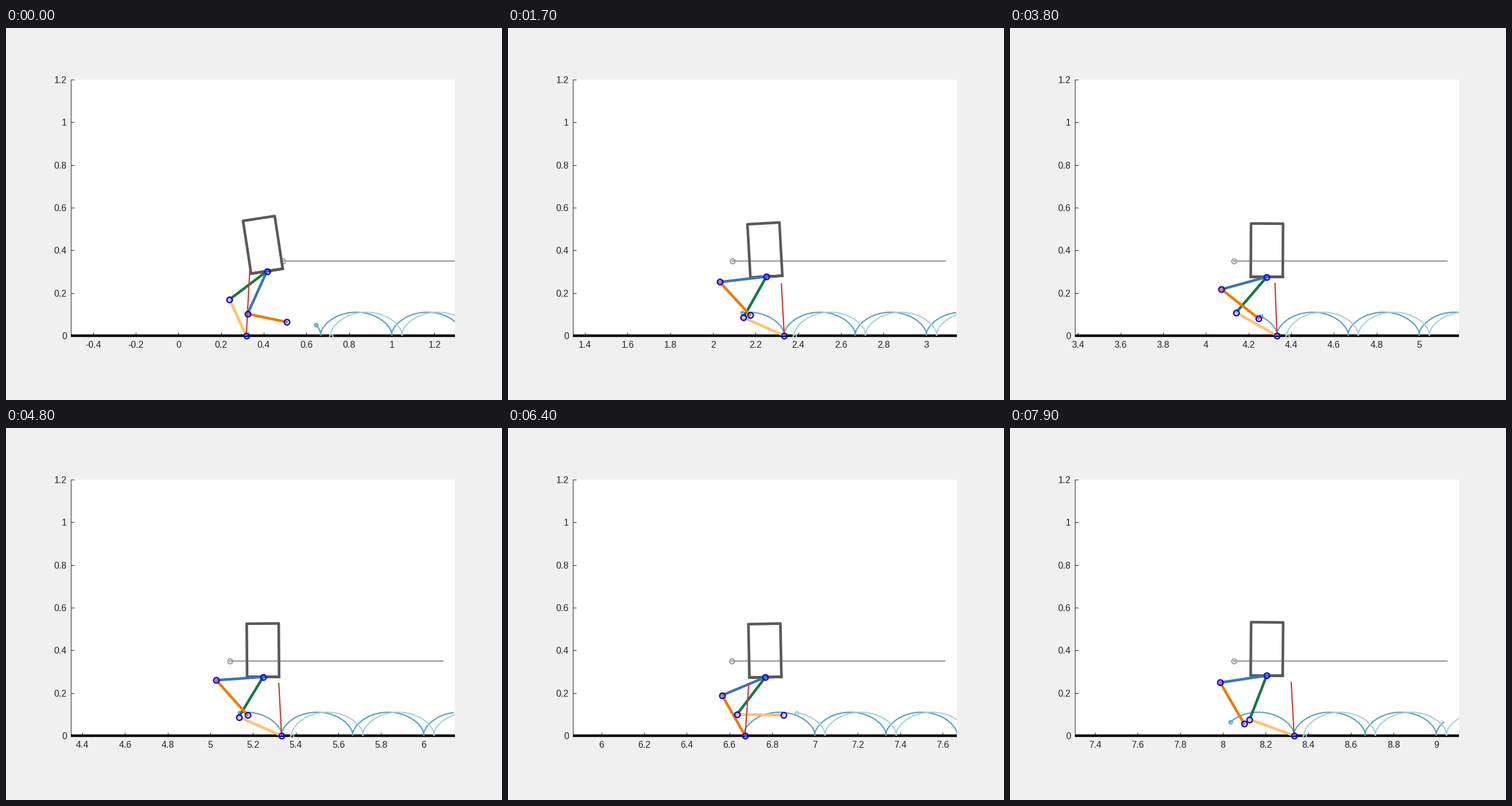
Write a matplotlib script that moves like this. It is 864 by 648 pixels and loops after 8000 ms.

```python
import numpy as np
import matplotlib.pyplot as plt
from matplotlib.animation import FuncAnimation
from matplotlib.ticker import FuncFormatter, MultipleLocator

W, H, DPI = 864, 648, 100
PX = 72 / DPI                      # one pixel in points
FRAMES, INTERVAL = 80, 100

THIGH = 0.22
BODY_W, BODY_H = 0.15, 0.25
STRIDE, SWING, LIFT = 1 / 3, 0.219, 0.11
LEAD = (0, 1 / 6)                  # gait phase shift of each leg

# body state at a few simulation ticks
TICKS = [12, 36, 52, 74, 103, 148, 182, 201]
HEIGHT = [0.426, 0.409, 0.4016, 0.402, 0.4005, 0.4005, 0.398, 0.4065]
TILT = [8.7, 5.2, 3.2, 2.4, -0.3, 1.1, 1.1, -0.5]
SHANK = [0.187, 0.200, 0.2097, 0.2104, 0.2205, 0.217, 0.2187, 0.222]
FORCE = [0.315, 0.255, 0.243, 0.245, 0.245, 0.245, 0.243, 0.25]

plt.rcParams["font.family"] = "Liberation Sans"
fig = plt.figure(figsize=(W / DPI, H / DPI), dpi=DPI, facecolor="#f0f0f0")
ax = fig.add_axes([113 / W, 112 / H, 669 / W, 446 / H])
ax.set_ylim(0, 1.2)
for side in ("top", "right", "bottom"):
    ax.spines[side].set_visible(False)
ax.spines["left"].set(linewidth=PX, color="#262626")
for axis in (ax.xaxis, ax.yaxis):
    axis.set_major_locator(MultipleLocator(0.2))
    axis.set_major_formatter(FuncFormatter(lambda v, _: f"{round(v, 1) + 0.0:g}"))
ax.tick_params(direction="in", length=6 * PX, width=PX, color="#262626",
               labelcolor="#262626", labelsize=16 * PX)
ax.tick_params(axis="x", pad=9.3 * PX)
ax.tick_params(axis="y", pad=7 * PX)


def stroke(color, width, z):
    return ax.plot([], [], color=color, lw=width * PX, zorder=z,
                   solid_joinstyle="round", snap=False)[0]


def rings(color, size, width, z):
    return ax.plot([], [], "o", mfc="none", mec=color, ms=size * PX,
                   mew=width * PX, zorder=z, clip_on=False, snap=False)[0]


ax.plot([0, 1], [0, 0], transform=ax.transAxes, color="black", lw=4.5 * PX,
        solid_capstyle="butt", clip_on=False, snap=False, zorder=2.6)

plan_line = stroke("#999999", 2.2, 3)
plan_dot = rings("#999999", 8.5, 2, 3)
step_lines = [stroke("#5fa3bd", 2.3, 3), stroke("#a9d1e1", 2.3, 3.1)]
step_dots = [rings("#5fa3bd", 6, 2, 3), rings("#a9d1e1", 6, 2, 3.1)]
body = stroke("#595959", 4.6, 4)
thighs = [stroke("#3d74b8", 4.6, 6), stroke("#17783f", 4.6, 5)]
shanks = [stroke("#ee7a05", 4.6, 6.1), stroke("#fdc26f", 4.6, 5.1)]
force = stroke("#c93a2d", 2.2, 7)
joints = rings("#0a0af0", 9.5, 2.5, 8)


def gait(t, leg):
    """Start of the current step and swing progress 0..1."""
    t = t - LEAD[leg]
    k = np.floor(t / STRIDE + 1e-9)
    return k * STRIDE, np.clip((t - k * STRIDE) / SWING, 0, 1)


def planned_step(t, leg):
    """Slightly widened cycloid."""
    x, s = gait(t, leg)
    a = 2 * np.pi * s
    x = x + (0, 0.381)[leg] + STRIDE * (s - 1.09 * np.sin(a) / (2 * np.pi))
    return x, LIFT / 2 * (1 - np.cos(a))


def landing(start, leg):
    """Touchdown position; the first steps fall one stride short."""
    t = start + LEAD[leg] + SWING
    return start + (0.34, 0.667)[leg] - 0.35 / (1 + np.exp((t - 0.5) / 0.02))


def foot_at(t, leg):
    delay = 0.013 * np.exp(-(t - 0.5) / 0.3)
    start, s = gait(t - delay, leg)
    bow, skew = ((0.055, 0.04), (0, 0.03))[leg]
    frac = s + bow * np.sin(np.pi * s) - skew * np.sin(2 * np.pi * s)
    a, b = landing(start - STRIDE, leg), landing(start, leg)
    y = 0.45 * LIFT * (1 - np.cos(2 * np.pi * s))
    return np.array([a + (b - a) * frac, y]), s >= 1


def knee_at(hip, foot, shank):
    v = foot - hip
    d = np.hypot(*v)
    v = v / d
    a = (THIGH**2 - shank**2 + d**2) / (2 * d)
    h = np.sqrt(max(THIGH**2 - a**2, 0))
    return hip + a * v + h * np.array([v[1], -v[0]])


def draw(i):
    n = 12 + i * 12 // 5           # simulation runs 2.4 ticks per frame
    t = 0.04 * n + 0.02
    height, tilt, shank, push = (np.interp(n, TICKS, v)
                                 for v in (HEIGHT, TILT, SHANK, FORCE))
    cx = t + 0.146 - 0.25 * np.exp(-(t - 0.5) / 0.36)
    ax.set_xlim(cx - 0.9, cx + 0.9)

    plan_line.set_data([t - 0.01, t + 0.99], [0.35, 0.35])
    plan_dot.set_data([t - 0.01], [0.35])
    ahead = np.linspace(t, t + 1, 201)
    for leg in (0, 1):
        x, y = planned_step(ahead, leg)
        step_lines[leg].set_data(x, y)
        step_dots[leg].set_data(x[:1], y[:1])

    c, s = np.cos(np.radians(tilt)), np.sin(np.radians(tilt))
    rot = np.array([[c, -s], [s, c]])
    center = np.array([cx, height])
    corners = np.array([[-1, -1], [1, -1], [1, 1], [-1, 1], [-1, -1], [1, -1]])
    corners = corners * [BODY_W / 2, BODY_H / 2]
    body.set_data(*(corners @ rot.T + center).T)

    hip = center + rot @ [0, -BODY_H / 2]
    points = [hip]
    force.set_data([], [])
    for leg in (0, 1):
        foot, planted = foot_at(t, leg)
        knee = knee_at(hip, foot, shank)
        thighs[leg].set_data(*zip(hip, knee))
        shanks[leg].set_data(*zip(knee, foot))
        points += [knee, foot]
        if planted:
            lean = 0.002 - 0.016 * np.tanh((foot[0] - cx) / 0.05)
            force.set_data([foot[0], foot[0] + lean], [0, push])
    joints.set_data(*zip(*points))
    return []


anim = FuncAnimation(fig, draw, frames=FRAMES, interval=INTERVAL,
                     init_func=lambda: draw(0), repeat=True, repeat_delay=0,
                     blit=False)
plt.show()
```
